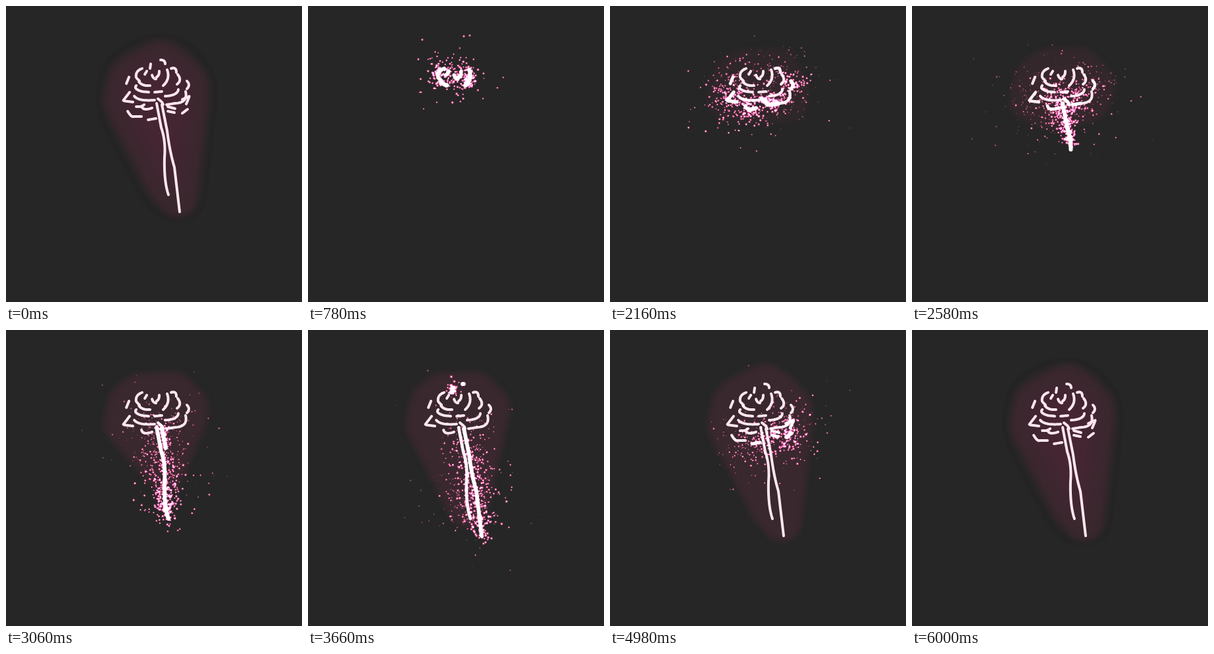
An HTML page with a canvas that plays this animation: 450x450 px, repeating every 6240 ms.

```html
<!DOCTYPE html>
<html lang="en">
<head>
<meta charset="utf-8">
<title>Sparkling rose</title>
<style>
  html, body { margin: 0; height: 100%; overflow: hidden; background: #262626; }
  canvas { display: block; width: 100vw; height: 100vh; }
</style>
</head>
<body>
<canvas id="stage" width="450" height="450"></canvas>
<script>
const ctx = document.getElementById('stage').getContext('2d');
const LOOP = 6240, STEP = 60, END = 6000;
const SPARKS = 3600, GLOW_DELAY = 450;

// Groups of strokes, each drawn in sequence between two times.
const groups = [
  { from: 320, to: 820, paths: [
    'M233 99Q233 106 229 108', 'M222 105Q224 111 228 111', 'M214 99L211 104',
    'M207 95Q196 99 198 109L203 114', 'M245 97Q250 111 239 121',
    'M202 115Q207 122 219 121'] },
  { from: 820, to: 1320, paths: [
    'M261 104Q268 113 260 119', 'M198 121Q193 126 207 130L217 131',
    'M226 131L237 130', 'M242 137Q261 136 262 127',
    'M195 137Q201 145 226 143', 'M273 130Q277 147 257 148'] },
  { from: 1320, to: 2160, paths: [
    'M251 95Q259 92 259 101', 'M187 108L183 118', 'M188 131L178 144L193 146',
    'M275 114Q281 120 275 126', 'M206 152Q208 160 222 155', 'M257 148L244 150',
    'M231 141L237 146L239 150'] },
  { from: 2220, to: 2940, stem: true, paths: [
    'M229 148L236 185Q243 205 241 230Q240 267 247 287'] },
  { from: 2960, to: 3540, stem: true, paths: ['M237 150L245 190Q249 222 256 245L264 313'] },
  { from: 3540, to: 3800, paths: ['M220 88L219 95', 'M235 82Q242 82 242 88'] },
  { from: 3800, to: 4260, paths: [
    'M198 153L206 153L210 150', 'M185 160Q191 170 194 168L206 168',
    'M246 153L257 156', 'M246 160L256 162', 'M268 142L279 137L274 149'] },
  { from: 4260, to: 4660, paths: ['M216 173L228 171', 'M268 163L276 157'] }
];

const clamp = x => Math.max(0, Math.min(1, x));
const ramp = (t, a, b) => clamp((t - a) / (b - a));

function samplePath(d) {
  const path = document.createElementNS('http://www.w3.org/2000/svg', 'path');
  path.setAttribute('d', d);
  const length = path.getTotalLength();
  const count = Math.ceil(length / 2);
  const points = Array.from({ length: count + 1 },
    (_, i) => path.getPointAtLength(length * i / count));
  return { points, length };
}

const strokes = groups.flatMap(({ from, to, stem, paths }) => {
  const sampled = paths.map(samplePath);
  const rate = (to - from) / sampled.reduce((sum, s) => sum + s.length, 0);
  let start = from;
  return sampled.map(s => {
    const stroke = { ...s, stem, start, end: start + s.length * rate };
    start = stroke.end;
    return stroke;
  });
});

function shownPoints(stroke, fraction) {
  if (!fraction) return [];
  return stroke.points.slice(0, Math.ceil(fraction * (stroke.points.length - 1)) + 1);
}

function trace(points) {
  const path = new Path2D();
  points.forEach(p => path.lineTo(p.x, p.y));
  return path;
}

function convexHull(points) {
  const sorted = [...points].sort((a, b) => a.x - b.x || a.y - b.y);
  const chain = list => {
    const hull = [];
    for (const p of list) {
      while (hull.length > 1) {
        const [a, b] = hull.slice(-2);
        if ((b.x - a.x) * (p.y - a.y) - (b.y - a.y) * (p.x - a.x) > 0) break;
        hull.pop();
      }
      hull.push(p);
    }
    return hull;
  };
  return [...chain(sorted), ...chain(sorted.reverse())];
}

let seed = 7;
function random() {
  seed = (seed * 1664525 + 1013904223) % 4294967296;
  return seed / 4294967296;
}

const first = strokes[0].start, last = strokes[strokes.length - 1].end;
const sparks = Array.from({ length: SPARKS }, (_, i) => {
  const birth = first + (last - first) * i / SPARKS;
  const stroke = strokes.find(s => birth < s.end) || strokes[strokes.length - 1];
  const along = ramp(birth, stroke.start, stroke.end);
  const origin = stroke.points[Math.round(along * (stroke.points.length - 1))];
  const angle = random() * Math.PI * 2;
  const r = random();
  const reach = 4 + 48 * r + 70 * r ** 16;
  return {
    birth, origin,
    dx: Math.cos(angle) * reach,
    dy: Math.sin(angle) * reach,
    life: 800 + 530 * random(),
    size: 0.9 + 0.9 * random()
  };
});

function dot(x, y, radius, color) {
  ctx.fillStyle = color;
  ctx.beginPath();
  ctx.arc(x, y, radius, 0, Math.PI * 2);
  ctx.fill();
}

function drawGlow(t) {
  const points = strokes.flatMap(s =>
    shownPoints(s, ramp(t - GLOW_DELAY, s.start, s.end) * (s.stem ? 0.86 : 1)));
  const outline = trace(convexHull(points));
  const layer = (color, width, blur, alpha) => {
    ctx.filter = `blur(${blur}px)`;
    ctx.globalAlpha = alpha;
    ctx.strokeStyle = ctx.fillStyle = color;
    ctx.lineWidth = width;
    ctx.fill(outline);
    ctx.stroke(outline);
  };
  ctx.save();
  layer('#39282e', 60, 4, ramp(t, 1100, 3000));
  const warmth = ramp(t, 5000, END);
  if (warmth) layer('#472634', 4, 18, warmth);
  ctx.restore();
}

function drawStrokes(t) {
  for (const s of strokes) {
    const shown = ramp(t, s.start, s.end);
    if (!shown) continue;
    const heat = 1 - ramp(t, s.end, s.end + 1100);
    ctx.strokeStyle = `rgb(255 ${230 + 25 * heat} ${239 + 16 * heat})`;
    ctx.lineWidth = 4 + 2 * heat;
    ctx.stroke(trace(shownPoints(s, shown)));
  }
}

function drawSparks(t) {
  ctx.save();
  ctx.globalCompositeOperation = 'lighter';
  for (const s of sparks) {
    const age = (t - s.birth) / s.life;
    if (age < 0 || age >= 1) continue;
    const travel = 1 - (1 - age) ** 2;
    const x = s.origin.x + s.dx * travel;
    const y = s.origin.y + s.dy * travel;
    const size = s.size * (1 - age) ** 0.4;
    ctx.globalAlpha = Math.min(1, 1.8 * (1 - age));
    dot(x, y, size * 1.4, 'rgb(215 45 115 / 0.6)');
    dot(x, y, size * 0.6, '#ffd5e5');
  }
  ctx.restore();
}

function draw(now) {
  const time = Math.floor(now % LOOP / STEP) * STEP;
  const t = time < STEP ? END : time;
  ctx.fillStyle = '#262626';
  ctx.fillRect(0, 0, 450, 450);
  ctx.lineCap = ctx.lineJoin = 'round';
  drawGlow(t);
  drawStrokes(t);
  drawSparks(t);
}

const began = performance.now();
function tick() {
  draw(performance.now() - began);
  requestAnimationFrame(tick);
}
tick();
</script>
</body>
</html>
```
